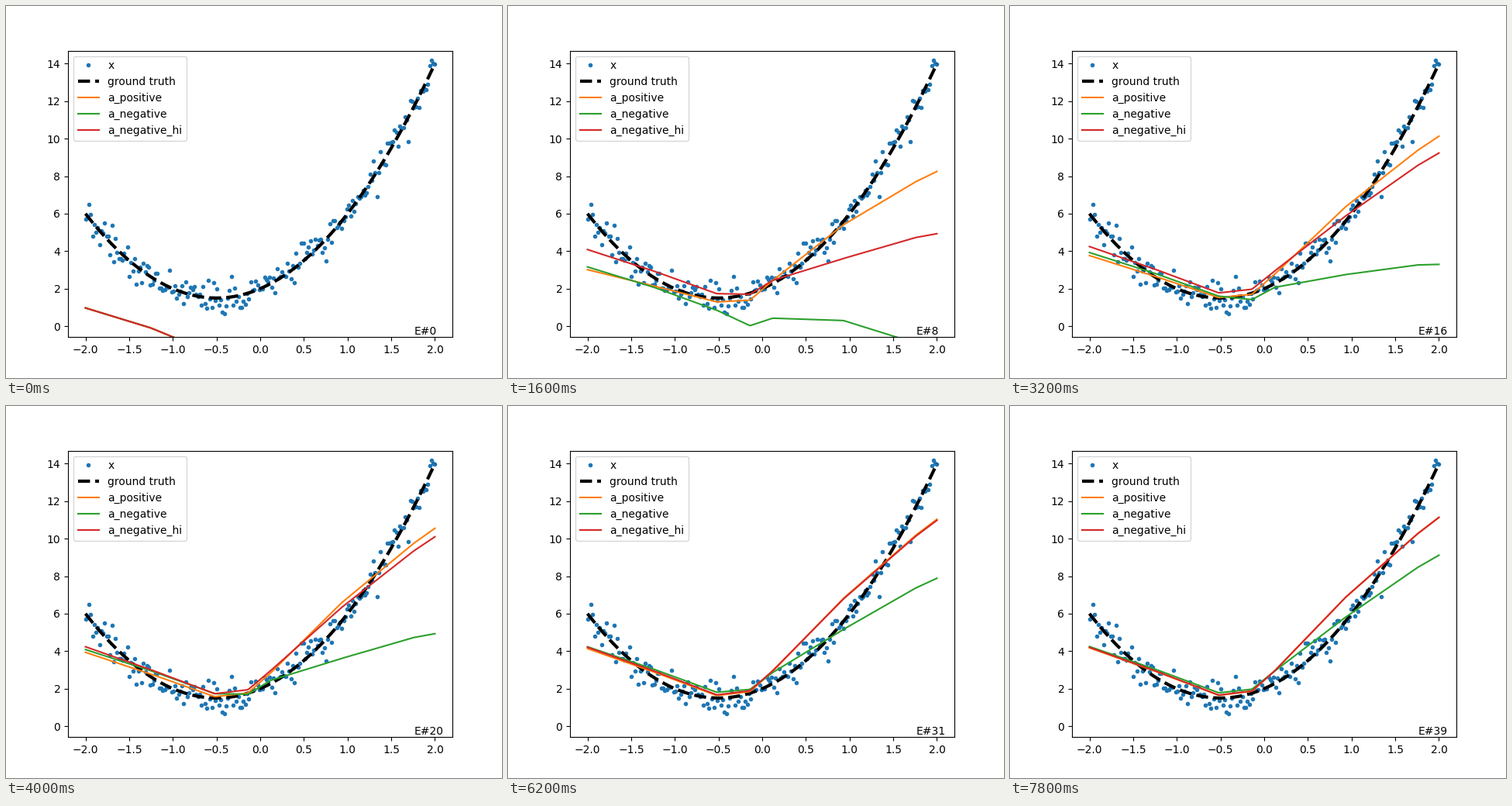
A matplotlib script for the animation above (8 s loop, 640 by 480 pixels).

```python
import numpy as np
import matplotlib.pyplot as plt
from matplotlib.animation import FuncAnimation

EPOCHS = 40
STEP_MS = 200

x = np.linspace(-2, 2, 200)
truth = 2 * x**2 + 2 * x + 2
samples = truth + np.random.default_rng(4).normal(0, 0.45, x.size)

# Every fit is linear between these bends and settles from START to END
BENDS = [-2, -1.25, -0.52, -0.14, 0.12, 0.93, 1.75, 2]
START = np.array([0.97, -0.1, -1.5, -4, -4, -3.6, -7.5, -8.8])
END = np.array([4.2, 2.95, 1.65, 1.87, 2.95, 6.9, 10.3, 11.2])

# Levels the quick phase heads for before the slow phase takes over
DIRECT = np.array([0.97, 0.8, 0.7, 0.6, 1.6, 2.9, 3.3, 3.3])
DETOUR = np.array([5, 4.2, 3.3, 3.5, 3.5, -3.6, -7.5, -8.8])

# label: (middle levels, quick rate, slow rate, learning speed)
MODELS = {
    "a_positive": (DIRECT, 0.7, 0.125, 1),
    "a_negative": (DETOUR, 0.3, 0.145, 0.4),
    "a_negative_hi": (DETOUR, 0.3, 0.145, 1),
}


def fit(model, epoch):
    middle, quick, slow, speed = model
    t = speed * epoch
    y = (END + (middle - END) * np.exp(-slow * t)
         + (START - middle) * np.exp(-quick * t))
    return np.interp(x, BENDS, y)


fig, ax = plt.subplots(figsize=(6.4, 4.8), dpi=100)
ax.plot(x, samples, ".", label="x")
ax.plot(x, truth, "k--", lw=3, label="ground truth")
lines = [ax.plot(x, fit(model, 0), color=f"C{n}", label=name)[0]
         for n, (name, model) in enumerate(MODELS.items(), 1)]
counter = ax.text(1.76, -0.46, "E#0")
ax.set_xlim(-2.2, 2.2)
ax.set_ylim(-0.584, 14.694)
ax.legend(loc="upper left")


def draw(epoch):
    for line, model in zip(lines, MODELS.values()):
        line.set_ydata(fit(model, epoch))
    counter.set_text(f"E#{epoch}")
    return [*lines, counter]


anim = FuncAnimation(fig, draw, frames=EPOCHS, interval=STEP_MS,
                     repeat=True, repeat_delay=0)
plt.show()
```
